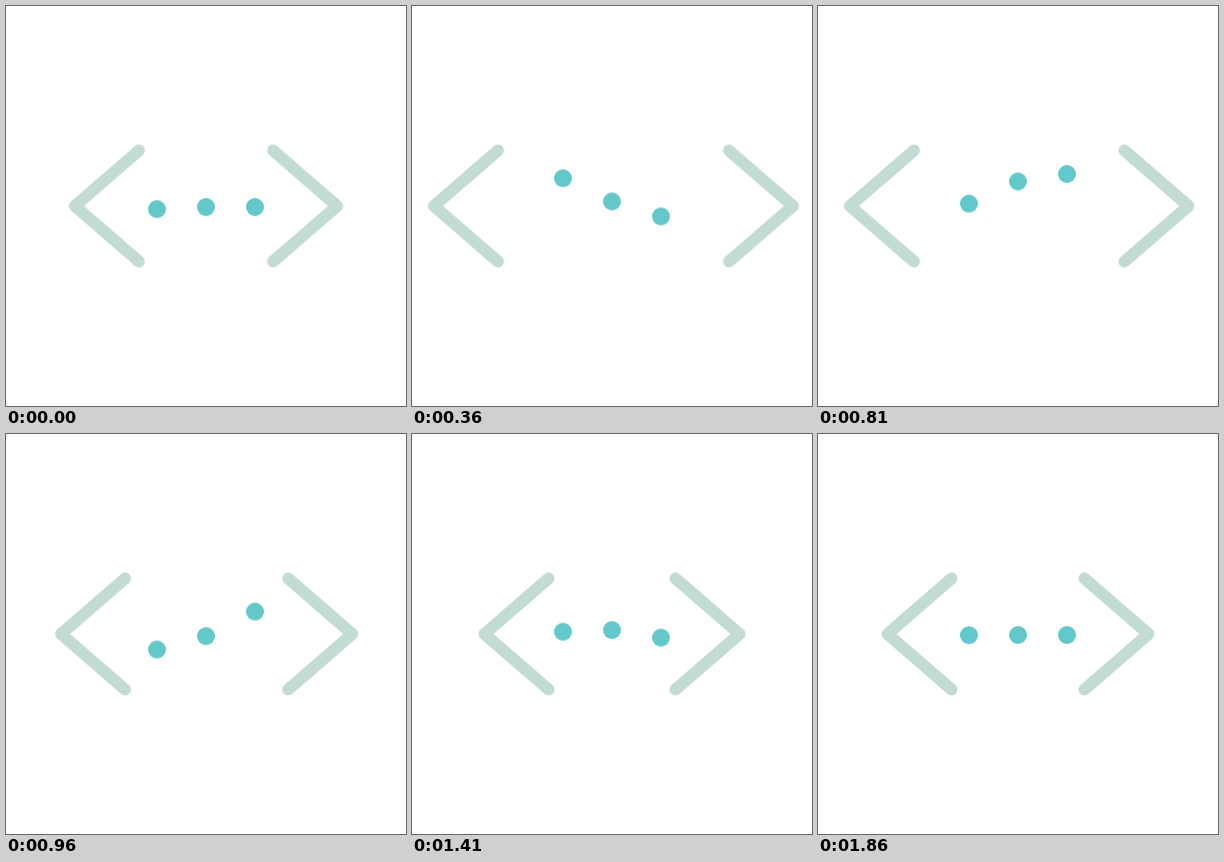
An HTML page for the animation above (1.89 s loop, 400 by 400 pixels).

```html
<!DOCTYPE html>
<html lang="en">
<head>
<meta charset="utf-8">
<title>Code loader</title>
<style>
  html, body {
    margin: 0;
    width: 100%;
    height: 100%;
    overflow: hidden;
    background: #fff;
  }

  svg {
    display: block;
    width: 100%;
    height: 100%;
  }

  svg * {
    animation: 1890ms cubic-bezier(.37, 0, .63, 1) infinite;
  }

  .bracket {
    fill: none;
    stroke: #c2dbd5;
    stroke-width: 12;
    stroke-linecap: round;
    stroke-linejoin: round;
    animation-name: spread;
    animation-delay: -30ms;
  }

  .left  { --out: -49.5px; --in: 10.2px; }
  .right { --out: 52.5px; --in: -10.2px; }

  .dot {
    fill: #63c8ca;
    animation-name: hop;
    animation-delay: calc(-40ms - var(--lead, 0ms));
  }

  /* Each dot trails the previous one by 130 ms, wrapped into the running loop. */
  .second { --lead: 1760ms; }
  .third  { --lead: 1630ms; }

  @keyframes spread {
    0%           { transform: translateX(0); }
    23.7%, 35.4% { transform: translateX(var(--out)); }
    66.1%        { transform: translateX(var(--in)); }
    82%, 100%    { transform: translateX(0); }
  }

  @keyframes hop {
    0%          { transform: translateY(0); }
    6.9%        { transform: translateY(9.5px); }
    25.4%       { transform: translateY(-34px); }
    27%         { transform: translateY(-34px); animation-timing-function: cubic-bezier(.72, 0, .63, 1); }
    53.2%       { transform: translateY(14.5px); }
    70.4%       { transform: translateY(-5px); }
    86.2%, 100% { transform: translateY(0); }
  }
</style>
</head>
<body>
<svg viewBox="0 0 400 400">
  <path class="bracket left" d="M133.5 144.5 L69.5 200 L133.5 255.5"/>
  <path class="bracket right" d="M266.5 144.5 L330.5 200 L266.5 255.5"/>
  <circle class="dot" cx="151" cy="201" r="9"/>
  <circle class="dot second" cx="200" cy="201" r="9"/>
  <circle class="dot third" cx="249" cy="201" r="9"/>
</svg>
</body>
</html>
```
